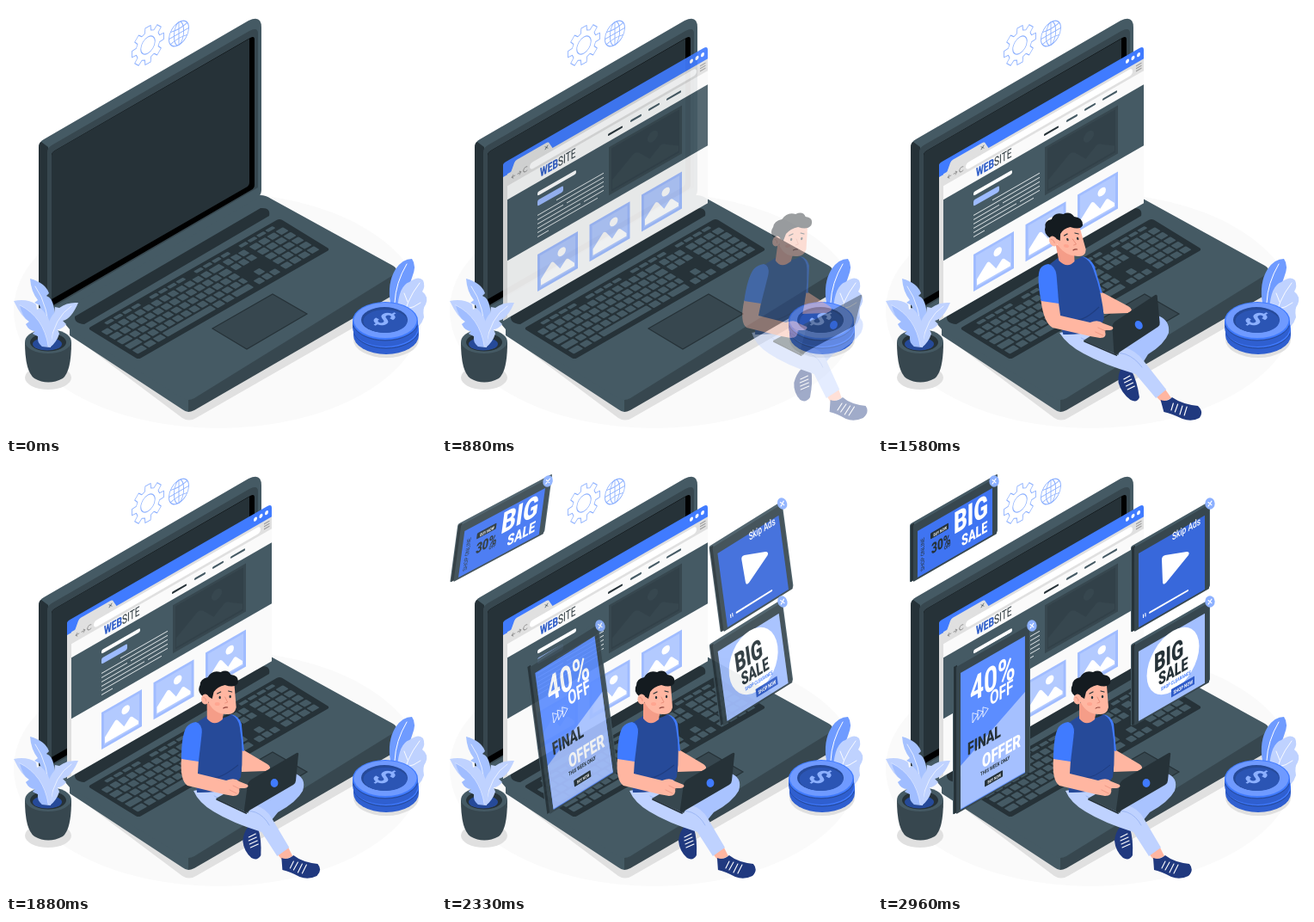
These frames come from a looping animation (500 by 500 pixels, 3000 ms). An HTML page:

```html
<!DOCTYPE html>
<html lang="en">
<head>
<meta charset="utf-8">
<title>Pop-up ads</title>
<style>
html, body { margin: 0; width: 100%; height: 100%; overflow: hidden; background: #fff; }
svg { display: block; width: 100vw; height: 100vh; }
text { font-family: Roboto, "Open Sans", sans-serif; }
</style>
</head>
<body>
<svg id="stage" viewBox="0 0 500 500"></svg>
<script>
const BLUE = '#407bff', MID = '#8cb0ff', PALE = '#bfd2ff', NAVY = '#264a99', SHOE = '#20397f';
const INK = '#263238', SLATE = '#37474f', STEEL = '#455a64', SKIN = '#ffb6a1';
const SLOPE = -0.575;

// Drawing helpers
const path = (d, fill, more = '') => `<path d="${d}" fill="${fill}" ${more}/>`;
const line = (d, color, w = 1) => path(d, 'none', `stroke="${color}" stroke-width="${w}" stroke-linecap="round" stroke-linejoin="round"`);
const oval = (x, y, rx, ry, fill, more = '') => `<ellipse cx="${x}" cy="${y}" rx="${rx}" ry="${ry}" fill="${fill}" ${more}/>`;
const box = (x, y, w, h, fill, r = 0, more = '') => `<rect x="${x}" y="${y}" width="${w}" height="${h}" rx="${r}" fill="${fill}" ${more}/>`;
const group = (body, more) => `<g ${more}>${body}</g>`;
const wall = (x, y, body, sx = 1) => group(body, `transform="matrix(${sx} ${SLOPE * sx} 0 1 ${x} ${y})"`);
const slab = (x, y, w, h, fill, r) => wall(x, y, box(0, 0, w, h, fill, r));
const label = (x, y, size, str, fill, weight = 700) =>
  wall(x, y, `<text font-size="${size}" font-weight="${weight}" fill="${fill}">${str}</text>`, 0.7);
const repeat = (n, fn) => Array.from({ length: n }, (_, i) => fn(i)).join('');

function gear() {
  let d = '';
  for (let i = 0; i < 8; i++) {
    [[-0.26, 16], [-0.17, 21.5], [0.17, 21.5], [0.26, 16]].forEach(([a, r], k) => {
      const t = i * Math.PI / 4 + a;
      d += `${i || k ? 'L' : 'M'}${(r * Math.cos(t)).toFixed(1)} ${(r * Math.sin(t)).toFixed(1)}`;
    });
  }
  return wall(165, 45.5, line(d + 'Z', MID) + oval(0, 0, 9.5, 9.5, 'none', `stroke="${MID}"`), 0.87);
}

function globe() {
  const ring = rx => oval(0, 0, rx, 13.3, 'none', `stroke="${MID}"`);
  return wall(201, 32, ring(13.3) + ring(6.5) +
    line('M0 -13V13M-13 0H13M-11 -7Q0 -4 11 -7M-11 7Q0 4 11 7', MID), 0.87);
}

function keyboard() {
  let keys = '';
  const key = (x, y, w, h = 6.8) => { keys += box(x, y, w, h, STEEL, 1); };
  for (let i = 0; i < 20; i++) if (i % 5) key(5 + i * 10.4, 3.5, 8.6, 3.8);
  for (let r = 0; r < 5; r++) {
    const y = 10.5 + r * 9;
    if (r < 4) {
      const lead = 7.5 + r * 2.4;
      key(5, y, lead);
      for (let i = 0; i < 12; i++) key(7 + lead + i * 9.6, y, 7.7);
      key(7 + lead + 115.2, y, 12.5 - r * 2.4);
    } else {
      [[5, 11], [18, 9], [29, 9], [40, 56], [98, 9], [109, 9], [120, 20]].forEach(([x, w]) => key(x, y, w));
    }
    if (r < 2) for (let i = 0; i < 3; i++) key(146 + i * 9, y, 7.2);
    for (let i = 0; i < 4; i++) key(177 + i * 10.3, y, 8.5);
  }
  key(155, 37.5, 7.2);
  for (let i = 0; i < 3; i++) key(146 + i * 9, 46.5, 7.2);
  return group(box(0, 0, 223, 59, INK, 3) + keys, 'transform="matrix(1 -.574 1 .61 95 375)"');
}

function laptop() {
  return path('M74 381L205 479Q213 484 221 479L446 350V326L290 240Z', '#e0e0e0') +
    path('M212 440V472Q215 472 219 470L454 334V309Z', SLATE) +
    path('M74 366V383L205 469Q209 472 212 472V440Z', STEEL) +
    path('M52 350L290 221Q299 218 308 224L450 302Q458 307 450 313L219 456Q212 460 205 456L74 376Z', STEEL) +
    path('M80 361L296 235Q308 234 306 244L91 370Q79 369 80 361Z', INK) +
    keyboard() +
    path('M240 375L310 335L350 358L280 399Z', SLATE, `stroke="${INK}" stroke-width="1.2"`) +
    // lid
    path('M38 165Q38 158 44 155L282 17Q297 10 297 25V214Q297 221 290 225L54 361L38 350Z', STEEL) +
    path('M38 165Q38 159 41 158L49 164V360L38 351Z', INK) +
    path('M48 170Q48 165 53 162L283 29Q293 24 293 32V211L48 354Z', SLATE) +
    path('M53 174Q53 170 57 168L284 37Q289 34 289 39V208Q289 212 285 214L53 349Z', '#000') +
    path('M53 174Q53 170 57 168L283 38V205Q283 209 279 211L53 341Z', INK);
}

function plantPot() {
  const leaf = (d, vein, fill) => path(d, fill) + line(vein, '#f3f7ff', 0.8);
  return oval(49, 432, 27, 14, '#e0e0e0') +
    path('M22 391Q22 425 33 433Q49 442 66 433Q76 425 76 391Z', SLATE) +
    oval(49, 390, 27, 14, STEEL) + oval(49, 391, 21, 10.5, INK) + oval(48, 393, 17, 7.5, NAVY) +
    leaf('M28 317Q46 322 50 334L47 337Q54 339 56 352Q59 372 52 392L45 380Q43 357 39 348L33 345L37 342Q29 332 28 317Z', 'M34 326Q50 348 51 390', '#a6c2ff') +
    leaf('M84 345Q76 364 66 366L70 370Q65 376 60 376L62 381Q59 391 51 397L47 389Q47 367 56 357L57 350L62 351Q71 344 84 345Z', 'M76 349Q56 362 51 395', PALE) +
    leaf('M9 343Q25 340 35 347L36 353L40 351Q51 361 54 378L52 397L42 396Q36 391 37 384L31 381L34 378Q27 378 23 370L27 367Q18 362 9 343Z', 'M16 348Q44 362 49 396', PALE) +
    path('M16 348Q44 362 49 396L42 396Q36 391 37 384L31 381L34 378Q27 378 23 370L27 367Q19 362 16 348Z', MID, 'opacity=".6"');
}

function coins() {
  const coin = (x, y) => path(`M${x - 38} ${y}V${y + 8}A38 22 0 0 0 ${x + 38} ${y + 8}V${y}Z`, '#2f5fd0') +
    line(`M${x - 37} ${y + 6}A38 22 0 0 0 ${x + 37} ${y + 6}`, NAVY) + oval(x, y, 38, 22, BLUE);
  return path('M447 346Q443 322 453 306Q461 294 472 294Q478 302 472 316Q467 332 458 347Z', '#6f9bff') +
    line('M466 300Q453 322 452 345', '#fff', 1) +
    path('M455 352Q457 325 469 321Q480 313 485 319Q488 326 484 332Q492 338 488 347Q484 352 486 362Q482 375 468 380Z', PALE) +
    line('M481 322Q464 344 462 366M467 344L463 334M466 352Q474 351 482 345', '#fff', 0.9) +
    oval(442, 388, 38, 21, '#e0e0e0') +
    coin(442, 375) + coin(441, 366) + oval(441, 365.5, 36.5, 20.5, '#6f9aff') +
    oval(440, 365, 27, 15, NAVY) + oval(441, 366.5, 25.5, 13.5, '#2b55b4') +
    group(`<text font-size="30" font-weight="700" fill="${MID}" text-anchor="middle" y="10.5">$</text>`,
      'transform="matrix(.9 .48 -.85 .52 440 364)"');
}

function picture(x, y, w, h, back, edge, fill) {
  return box(x, y, w, h, edge) + box(x + 3, y + 3, w - 6, h - 6, back) +
    path(`M${x + 4} ${y + h - 5}V${y + h * 0.72}L${x + w * 0.32} ${y + h * 0.45}Q${x + w * 0.36} ${y + h * 0.4} ${x + w * 0.41} ${y + h * 0.47}L${x + w * 0.56} ${y + h * 0.73}L${x + w * 0.7} ${y + h * 0.58}Q${x + w * 0.74} ${y + h * 0.55} ${x + w * 0.79} ${y + h * 0.63}L${x + w - 4} ${y + h * 0.8}V${y + h - 5}Z`, fill) +
    oval(x + w * 0.6, y + h * 0.3, h * 0.11, h * 0.11, fill);
}

function website() {
  const menu = [[122, 17, 38], [148, 13, 37], [169, 13, 36], [190, 17, 36]];
  const rows = [[62, 55], [40, 77], [40, 30], [74, 43], [40, 77], [40, 50], [94, 23], [40, 70], [40, 13]];
  const rowY = [78, 83, 88, 88, 93, 98, 98, 103, 108];
  return wall(71, 183,
    box(0, 2, 238, 181, '#fafafa') + box(0, 12, 5, 171, '#e0e0e0') +
    path('M0 16V2Q0 0 3 0H233Q238 0 238 5V16Z', BLUE) +
    path('M9 16L13 7Q14 5 16 5H50Q53 5 54 8L58 16Z', '#e0e0e0') + box(5, 15, 233, 14, '#e0e0e0') +
    line('M49 9l3 3m0 -3l-3 3', SLATE, 0.6) +
    line('M14 22H10l2 -2m-2 2l2 2M17 22h4l-2 -2m2 2l-2 2M28 20a2.6 2.6 0 1 0 0 4', '#8b8b8b', 0.8) +
    box(31, 18, 194, 8, '#fff', 4) +
    repeat(3, i => oval(219 + i * 6.5, 7, 2, 2.3, '#fff') + box(229, 18 + i * 3, 6.5, 1.2, '#9a9a9a')) +
    menu.map(([x, w, y], i) => box(x, y - 2, w, 2.4, i ? STEEL : INK, 1)).join('') +
    box(5, 45, 233, 71, STEEL) +
    box(40, 56.5, 45, 4.5, '#fff', 2) + box(40, 66, 30, 7, '#9dbbff', 2) +
    rows.map(([x, w], i) => box(x, rowY[i], w, 1, '#e3e8ea')).join('') +
    picture(123, 52, 85, 56, '#324149', SLATE, SLATE) +
    repeat(3, i => picture(40 + i * 60.5, 129, 47, 43, '#b3caff', '#a0bcff', '#fff'))) +
    wall(114, 199, `<text font-size="14.5" fill="${INK}"><tspan font-weight="900" fill="#315fc9">WEB</tspan>SITE</text>`, 0.7);
}

function frame(x, y, w, h, fill) {
  return slab(x - 1, y, w + 1, h, STEEL, 2) + slab(x, y + 1, 4, h - 2, INK) +
    slab(x + 3, y + 1, w - 4, h - 2, SLATE, 1) + slab(x + 8, y + 8, w - 14, h - 14, fill);
}
const badge = (x, y) => oval(x, y, 5.7, 6.8, MID) + line(`M${x - 2} ${y - 1.5}l4 3.2m0 -4.6l-4 6`, '#fff', 1.1);

const saleAd = () => frame(38, 70, 101, 68, '#3f74f2') +
  `<text font-size="6" fill="${INK}" transform="matrix(0 -1 1 -.57 54.5 123)">SHOP ONLINE</text>` +
  slab(61, 80.5, 21, 7, INK, 1) + label(64.5, 84.5, 5, 'BUY NOW', '#fff') +
  label(62, 105, 17, '30%', INK, 900) + label(77, 100, 6, 'OFF', INK) +
  label(88, 82, 35, 'BIG', '#fff', 900) + label(97, 96, 18, 'SALE', '#fff', 900) + badge(135, 20);

const offerAd = () => frame(88, 235, 89, 173, '#5c8dff') +
  path('M96 351L171 265V358L96 401Z', '#a5c0ff') +
  label(107, 278, 40, '40%', '#fff') + label(130, 281, 22, 'OFF', '#fff') +
  repeat(3, i => line(`M${110 + i * 6} ${290 - i * 3.4}v11l6 -9.5z`, '#fff', 0.8)) +
  label(104, 339, 20, 'FINAL', INK, 900) + label(121, 354, 21.5, 'OFFER', '#fff', 900) +
  label(119, 363, 6.3, 'THIS WEEK ONLY', INK) +
  slab(124, 368, 21, 7.5, INK, 1) + label(127.5, 372, 5, 'BUY NOW', '#fff') + badge(179, 188);

const videoAd = () => frame(295, 96, 91, 100, '#3868db') +
  label(342, 89, 12, 'Skip Ads', '#fff', 500) +
  path('M330 111Q330 107 334 106L359 102Q363 102 361 106L335 138Q331 142 331 137Z', '#fff') +
  slab(315, 172, 46, 2.2, '#fff', 1) + line('M308.5 175v3.5m2.4 -5v3.5', '#fff', 1.1) + badge(386, 46);

const shopAd = () => frame(295, 210, 91, 95, '#a3bfff') +
  wall(343, 229, oval(0, 0, 35, 35, '#fff'), 0.87) +
  label(321, 243, 30, 'BIG', INK, 900) + label(326, 258, 20.5, 'SALE', INK, 900) +
  label(329, 264, 5.8, 'SHOP CLEARANCE', BLUE) +
  slab(341, 262, 27, 9.5, '#2f5bc9') + label(343.5, 268, 6.2, 'SHOP NOW', '#fff') + badge(386, 160);

function person() {
  return path('M270 402L334 359Q350 364 345 380Q338 393 316 405L299 426L283 424L287 408Z', '#a9c3ff') +
    path('M282 421L293 424Q297 436 296 455Q292 462 285 458Q276 450 275 438Q276 428 282 421Z', SHOE) +
    line('M282 434l8 -4M282 438l9 -4M283 442l9 -4M284 446l9 -4', '#fff', 1.1) +
    path('M314 452L327 444L333 456L321 461Z', SKIN) +
    path('M320 458Q327 461 334 455Q344 463 362 465Q368 472 361 479Q351 484 341 480Q330 474 321 472Z', SHOE) +
    line('M334 462l-4 8M339 463l-5 9M344 465l-5 10M349 466l-5 10', '#fff', 1.1) +
    path('M218 380Q240 374 264 386L290 397Q302 400 309 412L329 446L315 456L297 428Q262 417 241 404Q224 394 218 380Z', PALE) +
    line('M242 386Q265 400 290 405Q300 409 306 420', '#8facf0', 0.7) +
    path('M272 330L304 349Q311 354 302 357L274 358Z', SKIN) +
    path('M262 291Q271 293 274 302L277 334L264 331Z', BLUE) +
    path('M220 302L235 292Q250 300 262 291Q271 296 272 306Q277 335 273 364Q262 383 222 382L218 345Z', NAVY) +
    path('M224 340Q225 320 228 311M270 350Q250 366 240 365', 'none', 'stroke="#1f3d80"') +
    // head
    path('M234 277L254 285L252 297Q242 306 234 296Z', '#f59d88') +
    path('M234 262Q250 250 266 258L268 283Q266 292 257 291Q243 291 236 278Z', SKIN) +
    path('M229 270Q222 264 226 257Q226 250 235 248Q240 239 250 242Q258 238 262 245Q272 246 270 255Q266 261 255 257Q246 259 242 265L240 273L235 270Z', '#141b20') +
    oval(232, 273.5, 4.6, 6, SKIN) + line('M230 271.5q3 0 3 4', '#e98f7b', 0.8) +
    oval(249, 271.5, 1.2, 1.7, INK) + oval(261, 270.5, 1.2, 1.7, INK) +
    line('M246 267l4 -2M259 264l4 1', INK, 1.2) + line('M255 271l3 6l-3 1', '#e98f7b', 0.9) +
    line('M253 284q2 -1.5 5 -1', '#8b4038', 1) + oval(246, 279, 3, 2, '#ff937f', 'opacity=".5"') +
    // computer and near arm
    path('M244 389L288 364L300 373L281 406Z', SLATE) + line('M245 390L279 406', INK, 1.8) +
    path('M281 372Q282 369 285 367L338 336Q341 335 340 339L337 368Q337 371 334 373L279 405Q276 405 277 401Z', INK) +
    oval(312, 371, 4.4, 5, BLUE) +
    path('M204 342L224 344L223 360L256 368Q266 364 271 369L281 373Q283 376 277 377L271 377Q273 386 264 386L253 384L211 374Q202 368 204 342Z', SKIN) +
    line('M264 374l8 4M260 379l8 4', '#e98f7b', 0.7) +
    path('M221 300Q228 302 228 312L224 346L204 343Q204 316 210 306Q214 301 221 300Z', BLUE);
}

// Moving parts: markup, side of entry, pivot height, start, duration
const parts = [
  [offerAd, 1, 295, 1965, 1000],
  [saleAd, -1, 75, 1965, 1000],
  [videoAd, 1, 118, 1965, 1000],
  [shopAd, 1, 230, 1965, 1000],
  [person, 1, 361, 465, 2000]
];

const stage = document.getElementById('stage');
stage.innerHTML = oval(247, 354, 238, 137, '#fafafa') + gear() + globe() + laptop() +
  group(website(), 'id="site"') + plantPot() + coins() +
  parts.map(([draw], i) => group(draw(), `id="part${i}"`)).join('');
const site = document.getElementById('site');
const nodes = parts.map((_, i) => document.getElementById('part' + i));

// cubic-bezier(.36, -.01, .5, 1.38)
function ease(x) {
  const curve = (t, a, b) => 3 * (1 - t) ** 2 * t * a + 3 * (1 - t) * t * t * b + t ** 3;
  let lo = 0, hi = 1;
  for (let i = 0; i < 24; i++) {
    const m = (lo + hi) / 2;
    if (curve(m, 0.36, 0.5) < x) lo = m; else hi = m;
  }
  return curve(lo, -0.01, 1.38);
}

// Steps of an entry: progress, slide, skew, opacity
const steps = [[0, 250, -0.364, 0], [0.6, 0, 0.176, 1], [0.8, 0, -0.035, 1], [1, 0, 0, 1]];

function dashIn(p) {
  if (p <= 0) return steps[0].slice(1);
  if (p >= 1) return steps[3].slice(1);
  const i = steps.findIndex(s => p < s[0]);
  const a = steps[i - 1], b = steps[i];
  const e = ease((p - a[0]) / (b[0] - a[0]));
  return [1, 2, 3].map(k => a[k] + (b[k] - a[k]) * e);
}

function render(t) {
  site.setAttribute('opacity', t < 80 ? 0 : Math.min(1, (t + 30) / 1000));
  parts.forEach(([, side, pivot, start, span], i) => {
    const [slide, skew, alpha] = dashIn((t - start) / span);
    const k = skew * side;
    nodes[i].setAttribute('transform', `matrix(1 0 ${k} 1 ${slide * side - k * pivot} 0)`);
    nodes[i].setAttribute('opacity', Math.max(0, Math.min(1, alpha)));
  });
}

const begin = performance.now();
function tick() {
  render((performance.now() - begin) % 3000);
  requestAnimationFrame(tick);
}
tick();
</script>
</body>
</html>
```
